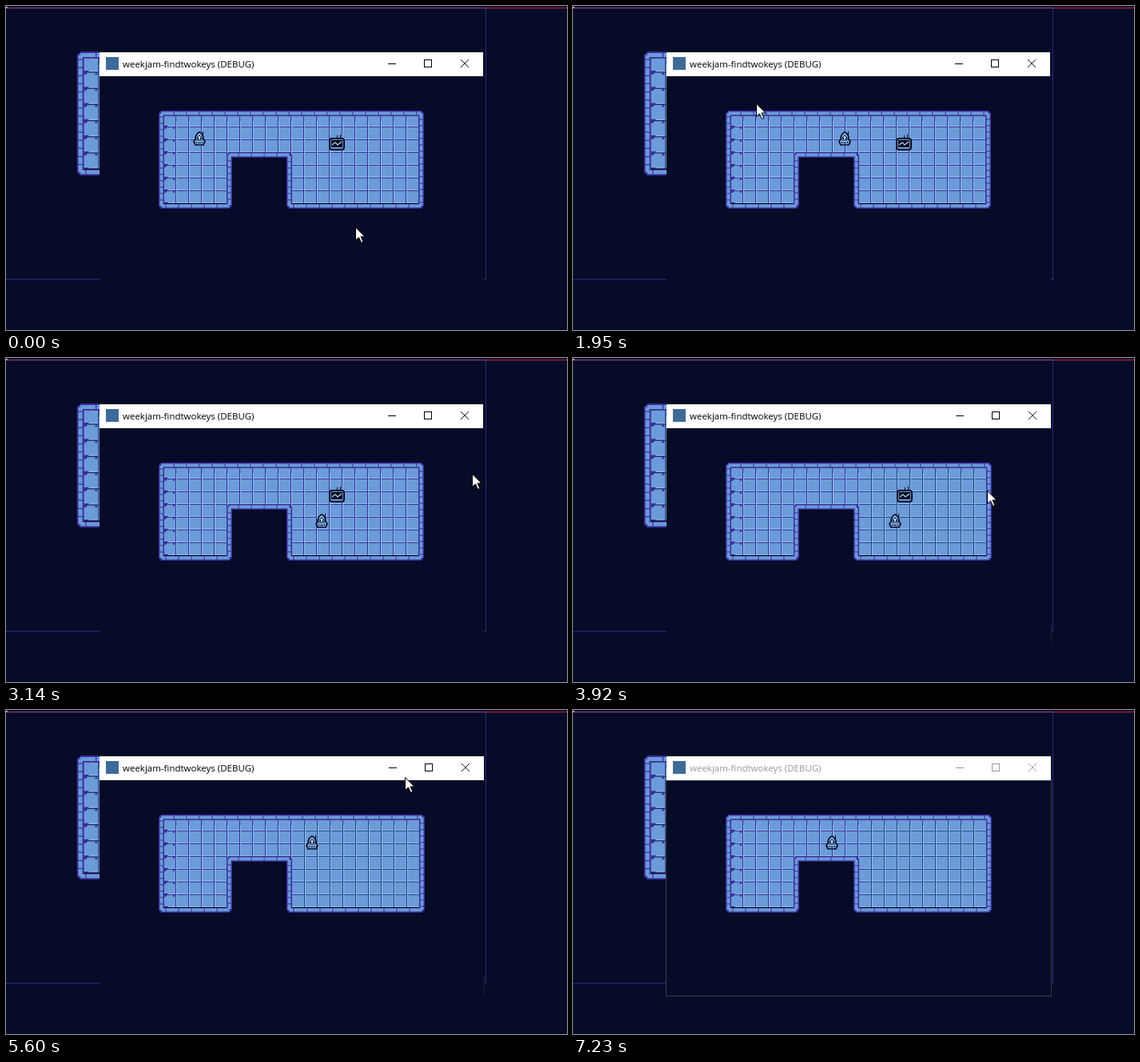
An HTML page with a canvas that plays this animation: 702 by 406 pixels, repeating every 7.28 s.

```html
<!DOCTYPE html>
<html lang="en">
<head>
<meta charset="utf-8">
<title>Debug window</title>
<style>
html, body { margin: 0; width: 100%; height: 100%; overflow: hidden; background: #060b27; }
canvas { position: absolute; left: 0; top: 0; }
#title {
  position: absolute; left: 146px; top: 58px;
  font: 11.5px/30px "Open Sans", "Noto Sans", sans-serif;
  white-space: nowrap;
}
</style>
</head>
<body>
<canvas id="stage" width="702" height="406"></canvas>
<div id="title">weekjam-findtwokeys (DEBUG)</div>
<script>
const W = 702, H = 406, LOOP = 7280, TILE = 16;
const BG = '#060b27', BLUE = '#6b9bd8', LIGHT = '#92bfee', PURPLE = '#3a2c9c', TEAL = '#20467f', INK = '#050a22';
const SHIFT_AT = 3700, PICKED_AT = 5000, GONE_AT = 7030, INACTIVE_AT = 7230;

// Held keys: each adds its distance evenly between two times.
const START = { x: 242, y: 166 };
const holds = [
  { from: 360, to: 2840, dx: 153, dy: 0 },
  { from: 2500, to: 3120, dx: 0, dy: 38 },
  { from: 3790, to: 3990, dx: 12, dy: 0 },
  { from: 4860, to: 5160, dx: -6, dy: -38 },
  { from: 5330, to: 6480, dx: -77, dy: 0 }
];

// Turning points of the pointer: time, x, y.
const turns = [
  [0, 438, 278], [300, 455, 240], [770, 281, 304], [1570, 124, 226],
  [1950, 230, 123], [2300, 365, 96], [3140, 584, 146], [3770, 523, 170],
  [4850, 521, 125], [5600, 500, 85], [6160, 463, 184], [6780, 600, 378], [GONE_AT, 618, 406]
];

const stage = document.getElementById('stage').getContext('2d');
const title = document.getElementById('title');

function rect(c, color, x, y, w, h) {
  c.fillStyle = color;
  c.fillRect(x, y, w, h);
}

function line(c, color, width, points, dash = []) {
  c.strokeStyle = color;
  c.lineWidth = width;
  c.setLineDash(dash);
  c.beginPath();
  points.forEach(([x, y]) => c.lineTo(x, y));
  c.stroke();
  c.setLineDash([]);
}

function shape(c, path, fill, stroke, width) {
  const p = new Path2D(path);
  if (fill) { c.fillStyle = fill; c.fill(p); }
  if (stroke) { c.strokeStyle = stroke; c.lineWidth = width; c.stroke(p); }
}

function pill(c, color, x, y, w, h, r) {
  c.fillStyle = color;
  c.beginPath();
  c.roundRect(x, y, w, h, r);
  c.fill();
}

function floor(c, seam) {
  rect(c, BLUE, 197, 136, 320, 112);
  for (let y = 151; y < 248; y += TILE) {
    rect(c, LIGHT, 197, y - 1, 320, 1);
    rect(c, seam, 197, y, 320, 1);
    // worn marks along the left column
    shape(c, `M198 ${y - 1}h5l-3 4h-2z`, PURPLE);
    rect(c, PURPLE, 209, y + 1, 2, 2);
  }
  for (let x = 212; x < 517; x += TILE) {
    rect(c, seam, x, 136, 1, 112);
    rect(c, LIGHT, x + 1, 144, 1, 104);
  }
}

function room(c, seam) {
  const left = 194.5, right = 519.5, top = 134.5, bottom = 250.5;
  const gapL = 279.5, gapR = 354.5, gapTop = 186.5;
  const wall = [
    [left, top], [right, top], [right, bottom], [gapR, bottom],
    [gapR, gapTop], [gapL, gapTop], [gapL, bottom], [left, bottom]
  ];
  floor(c, seam);
  rect(c, BG, gapL, gapTop, gapR - gapL, 68);
  c.lineJoin = 'bevel';
  line(c, PURPLE, 7, [...wall, wall[0], wall[1]]);
  wall.forEach((a, i) => {
    const b = wall[(i + 1) % wall.length];
    line(c, BLUE, 4, [a, b], a[1] === b[1] ? [15, 1] : [7, 1]);
  });
  rect(c, INK, 198, 247, 78, 1);
  rect(c, INK, 358, 247, 158, 1);
}

// Static picture of the desktop; the later one has its right part one pixel over.
function backdrop(moved) {
  const canvas = document.createElement('canvas');
  canvas.width = W;
  canvas.height = H;
  const c = canvas.getContext('2d');
  rect(c, BG, 0, 0, W, H);
  rect(c, '#31247f', 600, 3, 1, 340);
  rect(c, '#31247f', 0, 342, 600, 1);
  rect(c, '#8f4a8c', 0, 2, 601, 1);
  rect(c, '#b3263f', 601, 2, 101, 1);
  rect(c, '#d78bc0', 0, 1, 2, 2);

  // the same room, larger, behind the window
  c.save();
  c.translate(90, 57);
  c.scale(1.265, 1.265);
  c.translate(-192, -131);
  room(c, '#1b2562');
  c.restore();

  const right = moved ? 598 : 597;
  rect(c, BG, 117, 55, right - 117, 303);
  rect(c, '#fff', 117, 58, right - 117, 30);
  rect(c, '#3d6a99', 125, 64, 16, 16);
  room(c, PURPLE);
  if (moved) {
    c.save();
    c.beginPath();
    c.rect(365, 125, 200, 140);
    c.clip();
    c.translate(1, 0);
    rect(c, BG, 364, 125, 200, 140);
    room(c, TEAL);
    c.restore();
    rect(c, '#1d2132', 598, 335, 1, 23);
  }
  return canvas;
}

function buttons(c, color, dx) {
  rect(c, color, 478 + dx, 72, 10, 1);
  c.strokeStyle = color;
  c.lineWidth = 1;
  c.strokeRect(523.5 + dx, 67.5, 9, 9);
  line(c, color, .9, [[569 + dx, 67], [579 + dx, 77]]);
  line(c, color, .9, [[579 + dx, 67], [569 + dx, 77]]);
}

function tv(c, x) {
  rect(c, INK, x + 10, 162, 1, 4);
  rect(c, INK, x + 14, 161, 1, 5);
  pill(c, INK, x, 165, 20, 16, 4);
  pill(c, BLUE, x + 2, 167, 16, 12, 2);
  rect(c, INK, x + 3, 168, 14, 9);
  line(c, '#b9daf8', 1.2, [[x + 4, 174], [x + 8, 171], [x + 11, 174], [x + 16, 170]]);
}

function hero(c, x, y) {
  c.save();
  c.translate(x, y);
  rect(c, INK, 4, -9, 1, 6);
  shape(c, 'M0-8C-4-6-5-3-5 1L-7 4-5 8H5L7 4 5 1C5-3 4-6 0-8Z', '#7fb0e6', INK, 1.7);
  shape(c, 'M-3 2V-1L0-4 3-1V2Z', '#a9d0f5', INK, 1);
  for (const side of [-1, 1]) {
    rect(c, INK, side * 1.5 - .5, -1, 1, 2);
    rect(c, INK, side * 3.5 - .5, 4, 1, 2);
  }
  rect(c, INK, -2, 5, 4, 1);
  c.restore();
}

function arrow(c, x, y) {
  c.save();
  c.translate(x - .5, y - .5);
  shape(c, 'M0 0V16L4 12.5 7 19 9.5 18 6.5 11.5H11.5Z', '#fff', '#000', 1);
  c.restore();
}

function heroAt(t) {
  let { x, y } = START;
  for (const h of holds) {
    const u = Math.min(Math.max((t - h.from) / (h.to - h.from), 0), 1);
    x += h.dx * u;
    y += h.dy * u;
  }
  return [Math.round(x), Math.round(y)];
}

// Smooth curve through the turning points.
function pointerAt(t) {
  const last = turns.length - 1;
  let i = 0;
  while (i < last - 1 && t >= turns[i + 1][0]) i++;
  const a = turns[i], b = turns[i + 1], span = b[0] - a[0], u = (t - a[0]) / span;
  const slope = (j, k) => {
    const p = turns[Math.max(j - 1, 0)], n = turns[Math.min(j + 1, last)];
    return (n[k] - p[k]) / (n[0] - p[0]) * span;
  };
  return [1, 2].map(k => {
    const d = b[k] - a[k], m = slope(i, k), n = slope(i + 1, k);
    return Math.round(a[k] + m * u + (3 * d - 2 * m - n) * u * u + (m + n - 2 * d) * u ** 3);
  });
}

const before = backdrop(false), after = backdrop(true);

function draw() {
  const t = performance.now() % LOOP;
  const moved = t >= SHIFT_AT, idle = t >= INACTIVE_AT, dx = moved ? 1 : 0;
  stage.drawImage(moved ? after : before, 0, 0);
  buttons(stage, idle ? '#999' : '#000', dx);
  title.style.color = idle ? '#999' : '#000';
  if (idle) {
    stage.strokeStyle = '#363b48';
    stage.lineWidth = 1;
    stage.strokeRect(116.5, 88.5, 482, 270);
  }
  if (t < PICKED_AT) tv(stage, 404 + dx);
  hero(stage, ...heroAt(t));
  if (t < GONE_AT) arrow(stage, ...pointerAt(t));
  requestAnimationFrame(draw);
}
draw();
</script>
</body>
</html>
```
